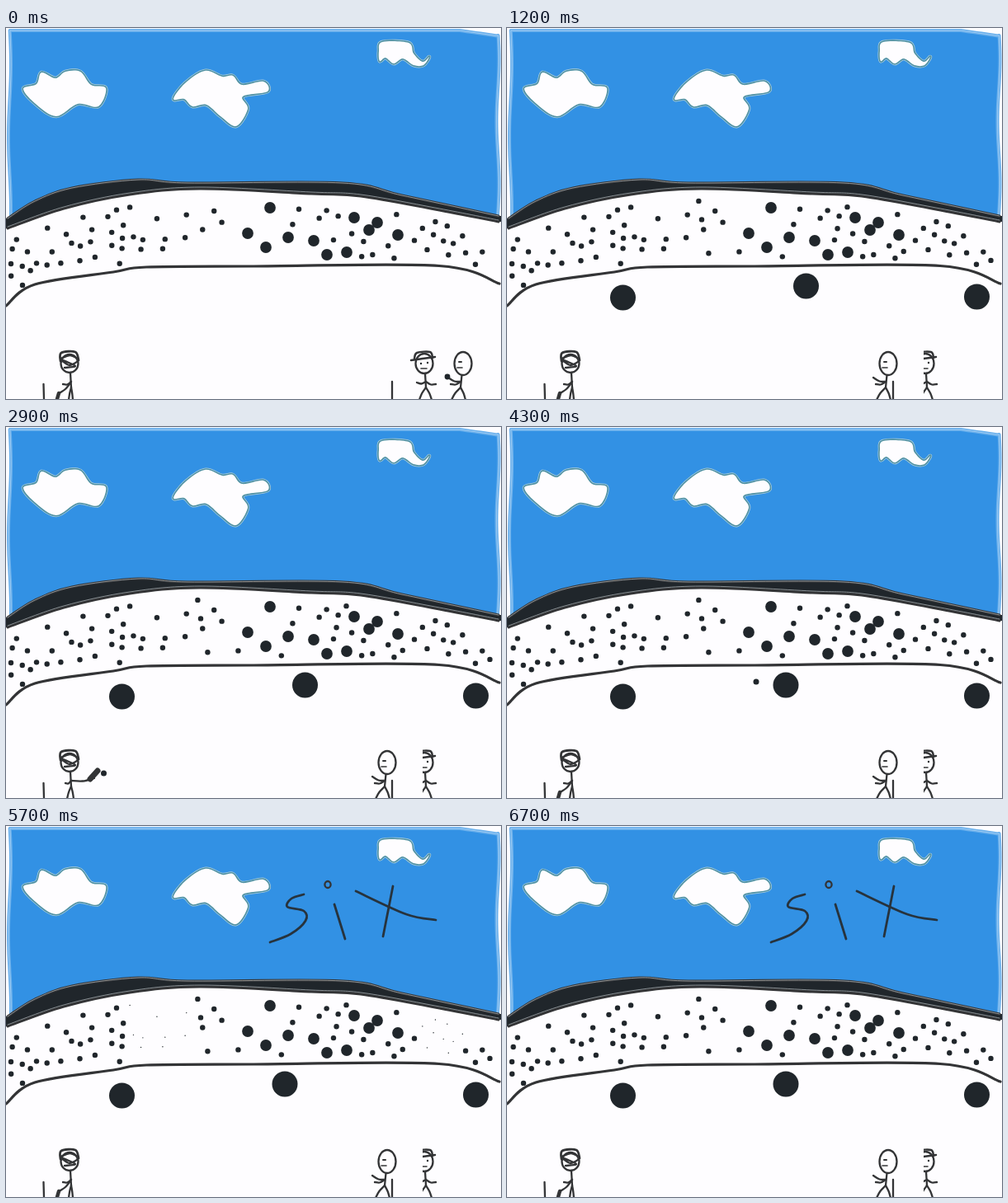
An HTML page with a canvas for the animation above (6800 ms loop, 600x450 px).

```html
<!DOCTYPE html>
<html lang="en">
<head>
<meta charset="utf-8">
<title>Six</title>
<style>
html, body { margin: 0; width: 100%; height: 100%; overflow: hidden; background: #fefdff; }
canvas { display: block; }
</style>
</head>
<body>
<canvas id="stage" width="600" height="450"></canvas>
<script>
const g = document.getElementById('stage').getContext('2d');
const LOOP = 6800, STEP = 100;
const INK = '#20262b', PAPER = '#fefdff', SKY = '#3291e4', PENCIL = '#333436', PALE = '#a4abaf';
g.lineCap = g.lineJoin = 'round';

const clamp = (v, lo, hi) => Math.min(hi, Math.max(lo, v));
const ramp = (t, t0, t1, a, b) => a + (b - a) * clamp((t - t0) / (t1 - t0), 0, 1);

// Smooth curve through every point of a flat x, y list.
function curve(p, closed) {
  const n = p.length / 2;
  const at = i => {
    const k = 2 * (closed ? (i + n) % n : clamp(i, 0, n - 1));
    return [p[k], p[k + 1]];
  };
  g.beginPath();
  g.moveTo(p[0], p[1]);
  for (let i = 0; i < (closed ? n : n - 1); i++) {
    const [a, b, c, d] = [at(i - 1), at(i), at(i + 1), at(i + 2)];
    g.bezierCurveTo(b[0] + (c[0] - a[0]) / 6, b[1] + (c[1] - a[1]) / 6,
      c[0] - (d[0] - b[0]) / 6, c[1] - (d[1] - b[1]) / 6, c[0], c[1]);
  }
}
function ink(width = 2.3, color = PENCIL) {
  g.lineWidth = width;
  g.strokeStyle = color;
  g.stroke();
}
function line(p, width, color) {
  curve(p);
  ink(width, color);
}
function dot(x, y, r) {
  g.beginPath();
  g.arc(x, y, r, 0, 7);
  g.fillStyle = INK;
  g.fill();
}
function oval(x, y, rx, ry) {
  g.beginPath();
  g.ellipse(x, y, rx, ry, 0, 0, 7);
  ink();
}

const wallTop = [2,231, 35,210, 80,194, 160,184, 220,188, 408,188, 480,203, 597,228];
const wallFoot = [2,243, 70,219, 150,202, 235,195, 370,201, 430,204, 520,220, 597,235];
const rope = [0,337, 35,311, 130,296, 170,290, 300,289, 525,288.5, 598,310];
const clouds = [
  [21,74, 37,68, 43,54, 60,61, 72,53, 90,53, 103,69, 121,73, 112,95, 87,92, 61,107, 37,93],
  [203,86, 217,67, 241,52, 262,59, 275,58, 286,69, 312,65, 317,77, 287,83, 293,98, 279,119, 260,107, 243,93, 226,95, 216,86],
  [452,28, 456,17, 488,18, 494,31, 505,41, 513,35, 506,45, 494,45, 481,37, 470,43, 460,36, 453,40]
];

// Spectators: a few large heads, then small ones strewn over the stand.
const heads = [320,218, 293,249, 315,266, 342,254, 373,258, 389,275, 413,272, 422,230, 440,245, 450,236, 475,251];
const crowd = [];
for (let i = 0; i < heads.length; i += 2) crowd.push({ x: heads[i], y: heads[i + 1], r: 6.9 });

let seed = 11;
function random() {
  seed = (seed * 16807) % 2147483647;
  return seed / 2147483647;
}
function heightAt(p, x) {
  let i = 0;
  while (i < p.length - 4 && p[i + 2] < x) i += 2;
  return ramp(x, p[i], p[i + 2], p[i + 1], p[i + 3]);
}
function strew(count, x0, x1, from) {
  while (count) {
    const x = x0 + (x1 - x0) * random();
    const y = heightAt(wallFoot, x) + 14 + (heightAt(rope, x) - heightAt(wallFoot, x) - 23) * random();
    if (crowd.some(c => Math.hypot(c.x - x, c.y - y) < c.r + 8)) continue;
    const jumps = (x > 150 && x < 228) || (x > 495 && x < 555);
    crowd.push({ x, y, r: 3.2, jumps, from });
    count--;
  }
}
strew(29, 6, 148, 0);
strew(12, 150, 285, 0);
strew(26, 300, 582, 0);
strew(9, 230, 590, STEP);

function ground(p, color) {
  curve(p);
  g.lineTo(600, p[p.length - 1]);
  g.lineTo(600, 450);
  g.lineTo(0, 450);
  g.lineTo(0, p[1]);
  g.fillStyle = color;
  g.fill();
}

function sky() {
  g.fillStyle = PAPER;
  g.fillRect(0, 0, 600, 450);
  g.beginPath();
  for (let y = 240; y >= 3; y -= 3) g.lineTo(4.5 + 1.5 * Math.sin(y / 28), y);
  for (let x = 5; x < 596; x += 5) g.lineTo(x, 3 + Math.max(0, x - 550) / 7);
  for (let y = 9; y < 232; y += 3) g.lineTo(596 + 1.5 * Math.sin(y / 24), y);
  g.fillStyle = SKY;
  g.fill();
  ink(4, '#68afec');
  ink(.7, '#b5d7f5');
  for (const c of clouds) {
    curve(c, true);
    ink(4.6, '#a9cde0');
    ink(3.2, '#4f91a3');
    g.fillStyle = PAPER;
    g.fill();
  }
}

function field() {
  ground(wallTop, INK);
  line(wallTop, 3);
  line(wallTop, .8, PALE);
  ground(wallFoot, PAPER);
  line(wallFoot, 3);
  line(wallFoot.map((v, i) => v - 2 * (i % 2)), .8, PALE);
  line(rope, 3.2);
}

function spectators(t) {
  const hop = t >= 5000 && (t - 5000) % 700 < 300;
  for (const c of crowd) if (!(t < c.from)) dot(c.x, c.y, hop && c.jumps ? .7 : c.r);
}

// Stick figure: hands are offsets from the shoulder, feet are offsets along the ground.
function figure(x, rx, ry, lean, hands, feet) {
  oval(x, 407, rx, ry);
  const hip = x + lean;
  line([x + lean / 2, 407 + ry, hip, 436]);
  for (const [dx, dy] of hands) line([hip, 429, hip + dx * .5, 431 + dy * .5, hip + dx, 429 + dy]);
  for (const dx of feet) line([hip, 436, hip + dx * .6, 443, hip + dx, 451]);
}

function batsman(swing) {
  const hands = swing ? [[28, -3], [-7, 3]] : [[-10, 3], [-13, 13]];
  figure(77, 10.5, 11, 2, hands, swing ? [-5, 3] : [-3, 2]);
  line([66,404, 67,394, 84,393, 88,403], 2.8);
  line([66,401, 78,397, 87,403, 77,409, 68,403, 84,410, 71,412], 2.3);
  line([45.5,432, 46,450]);
  if (swing) line([102,427, 111,417], 7);
  else line([64,443, 62,450], 4.5);
}

function umpire() {
  figure(507, 10.5, 12, 2, [[-11, 1], [12, 3]], [-8, 7]);
  line([491,403, 505,401, 520,399], 2.5);
  line([495,401, 498,394, 514,393, 517,400], 2.5);
  dot(503, 407, 1.2);
  dot(511, 406, 1.2);
  line([503,413, 510,413], 1.6);
}

function bowler(x, hasBall) {
  figure(x, 10.5, 14, -3, [[-15, -5], [-12, 3]], [-11, 6]);
  line([x - 5, 405, x - 2, 405], 2);
  line([x - 7, 412, x - 1, 412], 1.6);
  if (hasBall) dot(x - 19, 423, 3.4);
}

function players(t) {
  batsman(t >= 2900 && t < 3300);
  umpire();
  const x = ramp(t, 0, 1050, 554, 462);
  if (x < 495) {
    g.fillStyle = PAPER;
    g.fillRect(477, 388, 28, 62);
  }
  line([468,429, 468,450]);
  bowler(x, t < 1000);
  if (t >= STEP) {
    dot(140.5, 327, 15.5);
    dot(ramp(t, 3900, 4300, 362.5, 338), 313, 15.5);
    dot(569.5, 326, 15.5);
  }
}

function ball(t) {
  if (t >= 1700 && t <= 3200) dot(ramp(t, 1700, 2800, 448, 118.5), ramp(t, 1700, 2800, 425, 420), 3.5);
  if (t > 3200 && t < 4500) dot(ramp(t, 3200, 4200, 118.5, 302), ramp(t, 3200, 4200, 420, 309), 3.5);
}

function caption(t) {
  const stroke = p => line(p, 2.8, '#27333d');
  if (t >= 4600) stroke([361,83, 346,88, 341,98, 361,103, 363,115, 345,131, 320,141]);
  if (t >= 4700) {
    stroke([398,95, 411,137]);
    oval(390, 71, 3.6, 4);
  }
  if (t >= 4800) {
    stroke([424,79, 485,107, 521,114]);
    stroke([469,73, 457,134]);
  }
}

const start = performance.now();
function frame() {
  const t = Math.floor(((performance.now() - start) % LOOP) / STEP) * STEP;
  sky();
  field();
  spectators(t);
  players(t);
  ball(t);
  caption(t);
  requestAnimationFrame(frame);
}
frame();
</script>
</body>
</html>
```
